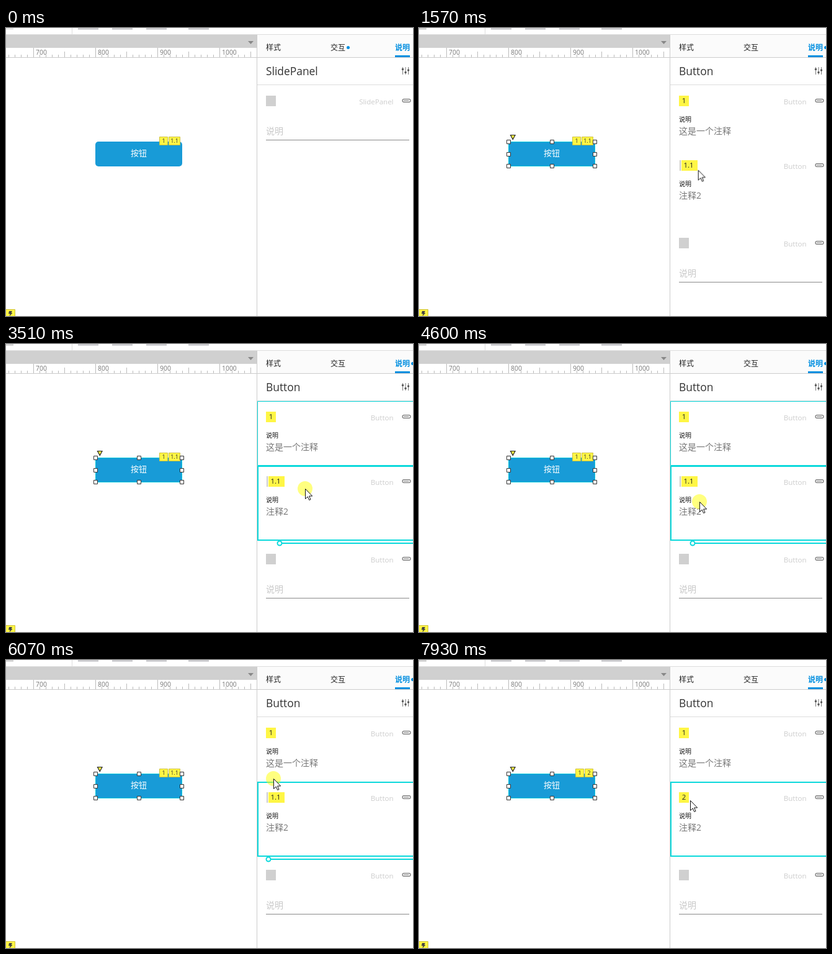
These frames come from a looping animation (656x464 px, 8 s). An HTML page:

```html
<!DOCTYPE html>
<html lang="zh">
<head>
<meta charset="utf-8">
<title>Notes panel</title>
<style>
html, body { margin: 0; width: 100%; height: 100%; overflow: hidden; background: #fff; }
svg { display: block; width: 656px; height: 464px; }
text { font-family: "Open Sans", "Noto Sans CJK SC", "Noto Sans CJK", sans-serif; }
.rule { font-size: 10.4px; fill: #777; }
.tab { font-size: 12px; fill: #222; }
.title { font-size: 17.4px; fill: #333; }
.name { font-size: 11.5px; fill: #ccc; text-anchor: end; }
.label { font-size: 10px; fill: #111; }
.body { font-size: 14px; fill: #777; }
.hint { font-size: 14px; fill: #c8c8c8; }
.num { font-size: 11.5px; fill: #222; text-anchor: middle; }
.mini { font-size: 9px; fill: #333; text-anchor: middle; }
.tag { fill: #fff645; }
.pin { fill: #fff645; stroke: #cfc23c; }
.drop { fill: none; stroke: #0cd9dc; }

/* one loop is 8 s, so 1% is 80 ms */
.t { animation: 8s step-end infinite; }
.idle { animation-name: idle; }
.picked { animation-name: picked; }
.nested { animation-name: nested; }
.flat { animation-name: flat; }
.item { animation-name: item; }
.inside { animation-name: inside; }
.outside { animation-name: outside; }
.bar { animation-name: bar; }
.press { animation-name: press; }
.arrow { animation-name: arrow; }
.move { animation-name: move; }
.beam { animation-name: beam; }
@keyframes idle { 0% { visibility: visible } 5.875%, 100% { visibility: hidden } }
@keyframes picked { 0% { visibility: hidden } 5.875%, 100% { visibility: visible } }
@keyframes nested { 0% { visibility: visible } 85.75%, 100% { visibility: hidden } }
@keyframes flat { 0% { visibility: hidden } 85.75%, 100% { visibility: visible } }
@keyframes item { 0% { visibility: hidden } 30.375%, 100% { visibility: visible } }
@keyframes inside { 0% { visibility: hidden } 43.8% { visibility: visible } 66%, 100% { visibility: hidden } }
@keyframes outside { 0% { visibility: hidden } 66% { visibility: visible } 85.75%, 100% { visibility: hidden } }
@keyframes bar { 0% { visibility: hidden } 2.875% { visibility: visible } 15.6%, 100% { visibility: hidden } }
@keyframes press {
  0% { visibility: hidden } 5.875% { visibility: visible } 6.875% { visibility: hidden }
  30.375% { visibility: visible } 31.3% { visibility: hidden }
  42.875% { visibility: visible } 85.75%, 100% { visibility: hidden }
}
@keyframes arrow {
  0% { visibility: hidden } .875% { visibility: visible } 6.875% { visibility: hidden }
  14.55% { visibility: visible } 20.5% { visibility: hidden }
  24.5% { visibility: visible } 25.5% { visibility: hidden } 31.3%, 100% { visibility: visible }
}
@keyframes move { 0% { visibility: hidden } 6.875% { visibility: visible } 14.55%, 100% { visibility: hidden } }
@keyframes beam {
  0% { visibility: hidden } 20.5% { visibility: visible } 24.5% { visibility: hidden }
  25.5% { visibility: visible } 31.3%, 100% { visibility: hidden }
}

.pointer { animation: path 8s step-end infinite; }
@keyframes path {
  0% { transform: translate(392px, 410px) }
  .875% { transform: translate(392px, 410px); animation-timing-function: steps(5) }
  5.875% { transform: translate(212px, 205px) }
  12.625% { transform: translate(212px, 205px); animation-timing-function: steps(5) }
  17.5% { transform: translate(458px, 233px) }
  18.69% { transform: translate(458px, 233px); animation-timing-function: steps(3) }
  21.5% { transform: translate(433px, 220px) }
  22.66% { transform: translate(433px, 220px); animation-timing-function: steps(2) }
  24.5% { transform: translate(441px, 220px); animation-timing-function: steps(2) }
  26.5% { transform: translate(438px, 219px) }
  30.375% { transform: translate(438px, 219px); animation-timing-function: steps(4) }
  34.125% { transform: translate(515px, 170px) }
  39% { transform: translate(515px, 170px); animation-timing-function: steps(2) }
  41% { transform: translate(480px, 215px) }
  41.875% { transform: translate(480px, 215px); animation-timing-function: steps(2) }
  43.8% { transform: translate(482px, 233px); animation-timing-function: steps(2) }
  45.875% { transform: translate(481px, 249px) }
  47.75% { transform: translate(481px, 253px) }
  51.5% { transform: translate(481px, 253px); animation-timing-function: steps(2) }
  53.6% { transform: translate(458px, 253px) }
  57.45% { transform: translate(452px, 254px) }
  58.35% { transform: translate(439px, 253px) }
  60.15% { transform: translate(439px, 253px); animation-timing-function: steps(11) }
  70.875% { transform: translate(417px, 242px) }
  73.85% { transform: translate(417px, 242px); animation-timing-function: steps(2) }
  75.8% { transform: translate(431px, 191px); animation-timing-function: steps(7) }
  82.6% { transform: translate(430px, 169px) }
  87.6% { transform: translate(430px, 169px); animation-timing-function: steps(8) }
  95.1% { transform: translate(448px, 205px) }
  96.3% { transform: translate(448px, 205px); animation-timing-function: steps(3) }
  99.1%, 100% { transform: translate(437px, 226px) }
}
</style>
</head>
<body>
<svg viewBox="0 0 656 464">
  <defs>
    <pattern id="ticks" x="44" y="32" width="100" height="16" patternUnits="userSpaceOnUse">
      <path d="M.5 0V16M50.5 6V16M10.5 11V16M20.5 11V16M30.5 11V16M40.5 11V16M60.5 11V16M70.5 11V16M80.5 11V16M90.5 11V16" stroke="#bbb"/>
    </pattern>
    <path id="clip" d="M649 119.500H641.500a2.500 2.500 0 0 1 0-5H649.500a2.500 2.500 0 0 1 0 5M641.500 117H649" fill="none" stroke="#666" stroke-width="1.100" stroke-linecap="round"/>
    <g id="blank">
      <path d="M419 109h16v17h-16z" fill="#d0d0d0"/>
      <use href="#clip"/>
      <text class="hint" x="419" y="171">说明</text>
      <path d="M419 180.500H650" stroke="#8a8a8a"/>
    </g>
    <g id="note">
      <text class="name" x="624.500" y="123">Button</text>
      <use href="#clip"/>
      <text class="label" x="419" y="151">说明</text>
    </g>
    <path id="knob" d="M-3-3H3V3H-3z" fill="#fff" stroke="#333"/>
  </defs>

  <path d="M0 0H656V464H0z" fill="#fff"/>

  <!-- toolbar and ruler -->
  <path d="M106.500 0V10M0 10.500H656" stroke="#ddd"/>
  <path d="M116 1.500h33M171 1.500h33M226 1.500h33M294 1.500h33" stroke="#8a8a92"/>
  <path class="t idle" d="M0 1.500h12" stroke="#ccc"/>
  <path class="t picked" d="M0 1.500h12" stroke="#999"/>
  <path d="M0 11H404V32H0z" fill="#d0d0d0"/>
  <path d="M390 21h9l-4.500 5z" fill="#888"/>
  <path d="M0 32H404V47H0z" fill="url(#ticks)"/>
  <path d="M0 47.500H404" stroke="#ccc"/>
  <g class="rule">
    <text x="48" y="43">700</text>
    <text x="148" y="43">800</text>
    <text x="248" y="43">900</text>
    <text x="348" y="43">1000</text>
  </g>

  <!-- canvas -->
  <rect x="144" y="183" width="140" height="40" rx="5" fill="#189bd7"/>
  <text x="214" y="206" font-size="13" fill="#fff" text-anchor="middle">按钮</text>
  <path class="t picked" d="M144.500 183.500h139v39h-139z" fill="none" stroke="#0cc8dc"/>
  <g class="t nested">
    <path class="pin" d="M247.500 175.500h13v13h-13zM262.500 175.500h18v13h-18z"/>
    <text class="mini" x="254" y="185">1</text>
    <text class="mini" x="271.500" y="185">1.1</text>
  </g>
  <g class="t flat">
    <path class="pin" d="M252.500 175.500h13v13h-13zM267.500 175.500h13v13h-13z"/>
    <text class="mini" x="259" y="185">1</text>
    <text class="mini" x="274" y="185">2</text>
  </g>
  <g class="t picked">
    <path d="M147.500 172.500h7.500l-3.750 7z" fill="#fff645" stroke="#222" stroke-width="1.200"/>
    <use href="#knob" x="144.500" y="183.500"/>
    <use href="#knob" x="214.500" y="183.500"/>
    <use href="#knob" x="283.500" y="183.500"/>
    <use href="#knob" x="144.500" y="203.500"/>
    <use href="#knob" x="283.500" y="203.500"/>
    <use href="#knob" x="144.500" y="222.500"/>
    <use href="#knob" x="214.500" y="222.500"/>
    <use href="#knob" x="283.500" y="222.500"/>
  </g>
  <path class="pin" d="M-1 453.500H14.500V465H-1z"/>
  <path d="M5 456h5l-1.500 3h2l-5 5.500 1-4h-2.500z" fill="#444"/>
  <rect class="t bar" x="395" y="368" width="7" height="28" rx="3" fill="#d6d6d6"/>

  <!-- panel -->
  <path d="M405 11H656V47H405z" fill="#fbfbfb"/>
  <path d="M404.500 11V464M405 47.500H656" stroke="#ccc"/>
  <path d="M405 91.500H656" stroke="#ddd"/>
  <text class="tab" x="419" y="36">样式</text>
  <text class="tab" x="523" y="36">交互</text>
  <text x="627" y="36" font-size="12" font-weight="700" fill="#008fe0">说明</text>
  <path d="M627 44h24v3h-24z" fill="#008fe0"/>
  <circle class="t idle" cx="551.500" cy="31.500" r="2.500" fill="#008fe0"/>
  <circle class="t picked" cx="655.500" cy="31.500" r="2.500" fill="#008fe0"/>
  <path d="M639.500 63v12M644 63v12M648.500 63v12" stroke="#777"/>
  <g fill="#555"><circle cx="639.500" cy="66.500" r="1.700"/><circle cx="644" cy="71.500" r="1.700"/><circle cx="648.500" cy="68" r="1.700"/></g>

  <g class="t idle">
    <text class="title" x="419" y="76">SlidePanel</text>
    <text class="name" x="624.500" y="123">SlidePanel</text>
    <use href="#blank"/>
  </g>

  <g class="t picked">
    <text class="title" x="419" y="76">Button</text>
    <use href="#note"/>
    <path class="tag" d="M419 109h16v17h-16z"/>
    <text class="num" x="427" y="121">1</text>
    <text class="body" x="419" y="171">这是一个注释</text>
    <use href="#note" y="104"/>
    <text class="body" x="419" y="275">注释2</text>
    <text class="name" x="624.500" y="352">Button</text>
    <use href="#blank" y="229"/>
  </g>
  <!-- nested number needs both a start and an end -->
  <g class="t nested">
    <g style="animation: reveal 8s step-end infinite">
      <path d="M420 213h2v17h-2z" fill="#ccc"/>
      <path class="tag" d="M423 213h26v17h-26z"/>
      <text class="num" x="434.500" y="225">1.1</text>
    </g>
  </g>
  <g class="t flat">
    <path class="tag" d="M419 213h16v17h-16z"/>
    <text class="num" x="427" y="225">2</text>
  </g>

  <path class="t item drop" d="M658 197H406V316H658" stroke-width="2"/>
  <g class="t inside drop">
    <path d="M658 92.500H405.500V195.500H658"/>
    <path d="M445 321H656" stroke-width="2"/>
    <circle cx="441" cy="321" r="3.500" fill="#fff" stroke-width="2"/>
  </g>
  <g class="t outside drop">
    <path d="M427 321H656" stroke-width="2"/>
    <circle cx="423" cy="321" r="3.500" fill="#fff" stroke-width="2"/>
  </g>

  <g class="pointer">
    <circle class="t press" r="12" fill="#ff0" fill-opacity=".5"/>
    <path class="t arrow" d="M.500.500V16.500L4.200 13 6.700 18.500 9 17.500 6.600 12H11.700z" fill="#fff" stroke="#111"/>
    <path class="t move" d="M0-10.500 4.500-6H1.500V-1.500H6V-4.500L10.500 0 6 4.500V1.500H1.500V6H4.500L0 10.500-4.500 6H-1.500V1.500H-6V4.500L-10.500 0-6-4.500V-1.500H-1.500V-6H-4.500z" fill="#fff" stroke="#222"/>
    <g class="t beam" fill="none">
      <path d="M-3.500-6.500H-1L.500-5 2-6.500H4.500M.500-5V6M-3.500 7.500H-1L.500 6 2 7.500H4.500" stroke="#222" stroke-width="2.600"/>
      <path d="M.500-5V6" stroke="#ddd" stroke-width=".8"/>
    </g>
  </g>
</svg>
<style>
@keyframes reveal { 0% { opacity: 0 } 5.875%, 100% { opacity: 1 } }
</style>
</body>
</html>
```
